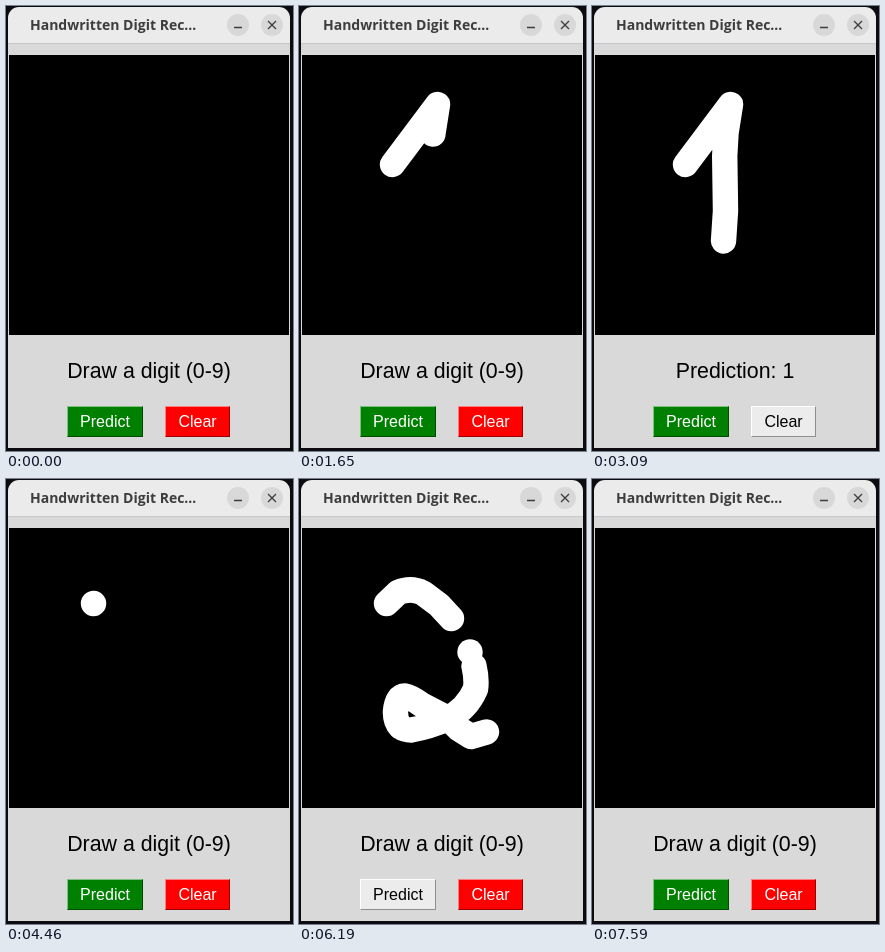
Write an HTML page that moves like this. It is 287 px wide and 445 px high and loops after 8 s.

```html
<!DOCTYPE html>
<html lang="en">
<head>
<meta charset="utf-8">
<title>Handwritten Digit Recognition</title>
<style>
  html, body { margin: 0; width: 100%; height: 100%; overflow: hidden; background: #0b0b10; }
  .stage { position: relative; width: 287px; height: 445px; overflow: hidden; }
  svg { position: absolute; left: 0; top: 0; }
  .title { font: 700 14px "Open Sans", sans-serif; fill: #3d3d3d; }

  .label, .button {
    position: absolute; box-sizing: border-box; text-align: center; white-space: nowrap;
    font-family: "Liberation Sans", Arial, sans-serif;
  }
  .label { left: 3px; top: 353px; width: 280px; font-size: 21.33px; line-height: 24px; color: #000; }
  .button {
    top: 400px; height: 31px; font-size: 16px; line-height: 29px;
    color: #fff; background: var(--face); border: 1px solid;
    border-color: var(--light) var(--dark) var(--dark) var(--light);
  }
  .predict { left: 61px; width: 76px; --face: #008000; --light: #7fbf7f; --dark: #004d00; }
  .clear { left: 159px; width: 65px; --face: #f00; --light: #ff7f7f; --dark: #900; }

  /* Everything shares one 8 s clock. */
  .label, .button, .ink * { animation: 8s step-end infinite; }
  .predict { animation-name: predict; }
  .clear { animation-name: clear; }
  .idle { animation-name: idle; }
  .result1 { animation-name: result1; }
  .result2 { animation-name: result2; }

  @keyframes predict {
    28.625%, 33.125%, 77.375% { background: #ececec; color: #000; border-color: #fff #8e8e8e #8e8e8e #fff; }
    32.375% { background: #ececec; color: #000; border-color: #8e8e8e #fff #fff #8e8e8e; }
    0%, 35.625%, 82.125%, 100% {
      background: var(--face); color: #fff;
      border-color: var(--light) var(--dark) var(--dark) var(--light);
    }
  }
  @keyframes clear {
    37.5%, 42.75%, 84.375%, 90.25% { background: #ececec; color: #000; border-color: #fff #8e8e8e #8e8e8e #fff; }
    41.625%, 89% { background: #ececec; color: #000; border-color: #8e8e8e #fff #fff #8e8e8e; }
    0%, 44.875%, 92.25%, 100% {
      background: var(--face); color: #fff;
      border-color: var(--light) var(--dark) var(--dark) var(--light);
    }
  }
  @keyframes idle {
    0%, 42.75%, 90.25%, 100% { opacity: 1; }
    33.125%, 79.5% { opacity: 0; }
  }
  @keyframes result1 { 0%, 42.75%, 100% { opacity: 0; } 33.125% { opacity: 1; } }
  @keyframes result2 { 0%, 90.25%, 100% { opacity: 0; } 79.5% { opacity: 1; } }

  .ink { fill: none; stroke: #fff; stroke-width: 25.4; stroke-linecap: round; stroke-linejoin: round; }
  .ink path { stroke-dasharray: 100 200; }
  .ink .one { animation-name: one; }
  .ink .arch { animation-name: arch; }
  .ink .dot { animation-name: dot; }
  .ink .tail { animation-name: tail; }

  @keyframes one {
    0% { opacity: 0; stroke-dashoffset: 99.9; }
    14.5% { opacity: 1; stroke-dashoffset: 99.9; animation-timing-function: steps(13); }
    20.625% { opacity: 1; stroke-dashoffset: 50.5; animation-timing-function: steps(8); }
    24.5% { opacity: 1; stroke-dashoffset: 0; }
    42.75%, 100% { opacity: 0; stroke-dashoffset: 0; }
  }
  @keyframes arch {
    0% { opacity: 0; stroke-dashoffset: 99.9; }
    55.75% { opacity: 1; stroke-dashoffset: 99.9; animation-timing-function: steps(6); }
    58.75% { opacity: 1; stroke-dashoffset: 0; }
    90.25%, 100% { opacity: 0; stroke-dashoffset: 0; }
  }
  @keyframes dot { 0%, 90.25%, 100% { opacity: 0; } 59.25% { opacity: 1; } }
  @keyframes tail {
    0% { opacity: 0; stroke-dashoffset: 99.9; }
    59.7% { opacity: 1; stroke-dashoffset: 99.9; animation-timing-function: steps(6); }
    62.625% { opacity: 1; stroke-dashoffset: 53.5; animation-timing-function: steps(6); }
    65.5% { opacity: 1; stroke-dashoffset: 33; animation-timing-function: steps(11); }
    70.125% { opacity: 1; stroke-dashoffset: 0; }
    90.25%, 100% { opacity: 0; stroke-dashoffset: 0; }
  }
</style>
</head>
<body>
<div class="stage">
  <svg width="287" height="445" viewBox="0 0 287 445">
    <path fill="#d9d9d9" d="M2 37H284V442H2Z"/>
    <path fill="#ebebeb" d="M2 37V12A11 11 0 0 1 13 1H273A11 11 0 0 1 284 12V37Z"/>
    <path fill="#c8c8cc" d="M2 37H284V38H2Z"/>
    <text class="title" x="24" y="24">Handwritten Digit Rec…</text>
    <g fill="#d8d8d8">
      <circle cx="232" cy="19" r="11"/>
      <circle cx="266" cy="19" r="11"/>
    </g>
    <path fill="none" stroke="#3d3d3d" stroke-width="1.3" d="M228 21.5H236M262 15L270 23M270 15L262 23"/>
    <path d="M3 49H283V329H3Z"/>
    <g class="ink">
      <path class="one" pathLength="100" d="M93.5 158.5L138.5 98.5L134 127L132.7 150L133.5 205L131.5 235"/>
      <path class="arch" pathLength="100" d="M87.5 124.5L99 113.5Q112 108 124 114L140 126L152.5 139.5"/>
      <path class="dot" d="M171 173h.01"/>
      <path class="tail" pathLength="100" d="M175 187Q178 200 176.5 210Q168 230 148 240Q130 248 112 251Q106 251 101.5 248Q96 242 96.5 232Q98 217 106 217Q112 218 123 226L150 240L160 250L172 257.5L187.5 253"/>
    </g>
  </svg>
  <div class="label idle">Draw a digit (0-9)</div>
  <div class="label result1">Prediction: 1</div>
  <div class="label result2">Prediction: 2</div>
  <div class="button predict">Predict</div>
  <div class="button clear">Clear</div>
</div>
</body>
</html>
```
